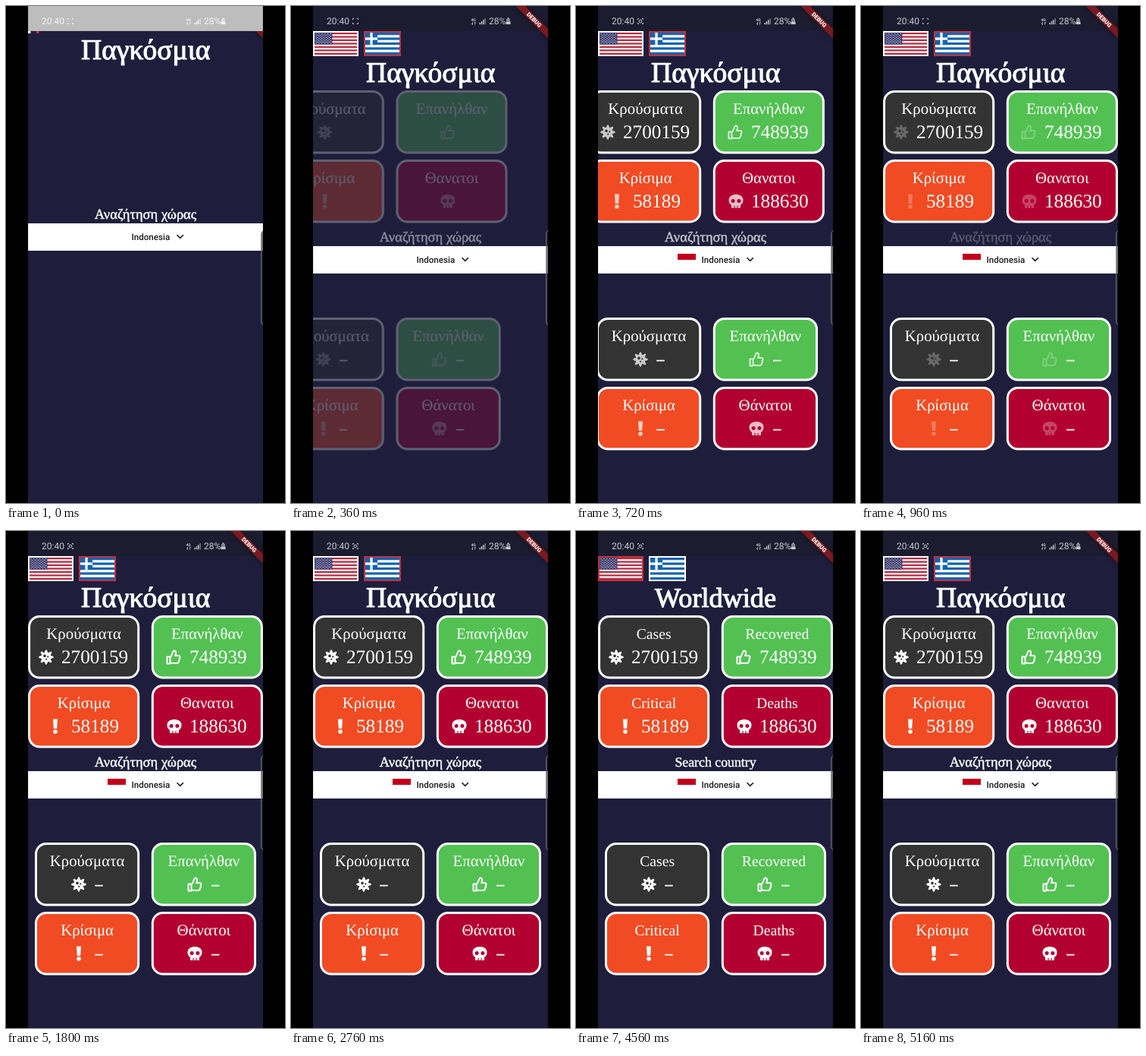
Animation of 368 by 654 pixels, one loop 5280 ms. Source, as an HTML page:

```html
<!DOCTYPE html>
<html lang="el">
<head>
<meta charset="utf-8">
<title>Dashboard</title>
<style>
html, body { margin: 0; width: 100%; height: 100%; overflow: hidden; background: #000; }
svg { display: block; font-family: "Liberation Serif", serif; text-rendering: geometricPrecision; }
.sans { font-family: Roboto, sans-serif; }
.mid { text-anchor: middle; }
.heavy { fill: #fff; stroke: #fff; }
.ribbon { filter: drop-shadow(0 0 3px rgba(0, 0, 0, .5)); }

/* one loop = 5280 ms */
.boot, .ready, .layout, .el, .en, .data, .nudge, .rec { animation: 5280ms step-end infinite; }
.boot { animation-name: boot; }
.ready { animation-name: ready; }
.layout { animation-name: layout; }
.el { animation-name: greek; }
.en { animation-name: english; }
.data { animation-name: data; }
.nudge { animation-name: nudge; }
.rec { animation-name: rec; }
.flash { animation: flash 5280ms linear infinite; }
.cards { animation: slide 5280ms linear infinite, fade 5280ms linear infinite; }

@keyframes boot { 0% { opacity: 1 } 2.2%, 100% { opacity: 0 } }
@keyframes ready { 0% { opacity: 0 } 2.2%, 100% { opacity: 1 } }
@keyframes layout { 0% { transform: translateY(-30px) } 2.2%, 100% { transform: none } }
@keyframes greek { 0% { opacity: 1 } 65.8% { opacity: 0 } 90.8%, 100% { opacity: 1 } }
@keyframes english { 0% { opacity: 0 } 65.8% { opacity: 1 } 90.8%, 100% { opacity: 0 } }
@keyframes data { 0% { opacity: 0 } 9%, 100% { opacity: 1 } }
@keyframes nudge { 0% { transform: translateX(var(--dx)) } 9%, 100% { transform: translateX(0) } }
@keyframes rec {
  0%, 17%, 36%, 54.5%, 76% { opacity: 0 }
  9%, 27.2%, 45.4%, 65.8%, 86.3%, 100% { opacity: 1 }
}
@keyframes flash {
  0%, 4.9% { opacity: 1 }
  8.7% { opacity: 0 }
  12.5% { opacity: 1 }
  16.9% { opacity: 0 }
  21.9%, 100% { opacity: 1 }
}
@keyframes slide {
  0% { transform: translateX(-86px) }
  3.03% { transform: translateX(-86px); animation-timing-function: ease-out }
  18.18%, 100% { transform: translateX(0) }
}
@keyframes fade { 0%, 4.2% { opacity: 0 } 13.1%, 100% { opacity: 1 } }
</style>
</head>
<body>
<svg id="stage" width="368" height="654"></svg>
<script>
const WHITE = '#fff', RED = '#c4323c';
const LEFT = 29.1, WIDTH = 309.8, MID = LEFT + WIDTH / 2;

const rect = (x, y, w, h, fill, extra = '') =>
  `<rect x="${x}" y="${y}" width="${w}" height="${h}" fill="${fill}" ${extra}/>`;
const text = (x, y, size, str, extra = '') =>
  `<text x="${x}" y="${y}" font-size="${size}" ${extra}>${str}</text>`;
const group = (cls, body, extra = '') => `<g class="${cls}" ${extra}>${body}</g>`;
const placed = (x, y, body) => `<g transform="translate(${x} ${y})">${body}</g>`;
const times = (n, f) => Array.from({ length: n }, (_, i) => f(i)).join('');
const dot = (x, y, r, fill) => `<circle cx="${x}" cy="${y}" r="${r}" fill="${fill}"/>`;

// Icons are drawn around 0,0; c is the card colour used for holes
const icons = {
  virus: c => times(8, i => `<path d="M-2.6 -5L-.9 -9.6H.9L2.6 -5Z" fill="#fff" transform="rotate(${i * 45})"/>`) +
    dot(0, 0, 6.2, WHITE) + dot(-2, -1.6, 1.8, c) + dot(2.3, -.6, 1.1, c) + dot(.2, 2.8, 1.1, c),
  thumb: () => `<path fill="none" stroke="#fff" stroke-width="2" stroke-linejoin="round"
    d="M-8.5 -.5H-4.5V8.5H-8.5ZM-4.5 .3C-1 -3 -1.5 -8.5 .6 -8.5C4 -8.5 3.3 -4 2 -2H6.5C9 -2 9 1 7.5 1.5C8.5 3 8 4.2 7 4.6C7.5 6.5 6 8 4 8H0C-2 8 -3 7.2 -4.5 7"/>`,
  alert: () => `<path fill="#fff" d="M-3 -9.5H3L2.2 3H-2.2Z"/>` + dot(0, 7, 2.8, WHITE),
  skull: c => `<path fill="#fff" d="M-9.5 -1.5C-9.5 -7 -5 -9 0 -9S9.5 -7 9.5 -1.5C9.5 2 8 3.5 6 5V8Q6 9 5 9H-5Q-6 9 -6 8V5C-8 3.5 -9.5 2 -9.5 -1.5Z"/>` +
    dot(-3.9, -.5, 2.5, c) + dot(3.9, -.5, 2.5, c) +
    `<path d="M-2 6V9M2 6V9" stroke="${c}" stroke-width="1.2"/>`
};

const kinds = [
  { icon: 'virus', fill: '#333333', el: 'Κρούσματα', en: 'Cases', value: '2700159', at: 53, num: 73 },
  { icon: 'thumb', fill: '#52c152', el: 'Επανήλθαν', en: 'Recovered', value: '748939', at: 221, num: 242 },
  { icon: 'alert', fill: '#f14b23', el: 'Κρίσιμα', en: 'Critical', value: '58189', at: 65, num: 86 },
  { icon: 'skull', fill: '#b20030', el: 'Θανατοι', elLower: 'Θάνατοι', en: 'Deaths', value: '188630', at: 222, num: 242 }
];

function card(k, i, lower) {
  const right = i % 2, row = i >> 1;
  const w = lower ? 138.2 : 147.1;
  const x = right ? MID + 7.8 : MID - 7.8 - w;
  const y = (lower ? 410 : 111) + row * 91;
  const mid = x + w / 2, base = y + 31.3;
  const glyph = group('flash', icons[k.icon](k.fill));
  let out = rect(x + 1.5, y + 1.5, w - 3, 80.5, k.fill, 'rx="13.6" stroke="#fff" stroke-width="3"') +
    text(mid, base, 20.8, lower && k.elLower || k.el, 'class="mid el"') +
    text(mid, base, 19.7, k.en, 'class="mid en"');
  if (lower) {
    out += placed(right ? 249 : 96, y + 55, glyph) +
      text(right ? 271.5 : 117.8, y + 60.6, 19, '–', 'stroke="#fff" stroke-width=".7"');
  } else {
    const dx = (right ? 260 : 98) - k.at;
    out += placed(k.at, y + 55, group('nudge', glyph, `style="--dx:${dx}px"`)) +
      text(k.num, y + 63, 25.2, k.value, 'class="data"');
  }
  return out;
}

const frame = (x, w, color) => rect(x + 1, 34, w - 2, 31, 'none', `stroke="${color}" stroke-width="2"`);

function usFlag() {
  const h = 29 / 13;
  return rect(31, 35, 56, 29, WHITE) +
    times(7, i => rect(31, 35 + i * 2 * h, 56, h, '#b52b40')) +
    rect(31, 35, 23.5, h * 7, '#3a3b6e') +
    times(9, r => times(6 - r % 2, c => dot(33 + c * 3.9 + (r % 2) * 1.95, 36.7 + r * 1.53, .6, WHITE)));
}

function greekFlag() {
  const h = 29 / 9, blue = '#1463b0';
  return rect(98, 35, 45, 29, WHITE) +
    times(5, i => rect(98, 35 + i * 2 * h, 45, h, blue)) +
    rect(98, 35, h * 5, h * 5, blue) +
    rect(98, 35 + h * 2, h * 5, h, WHITE) + rect(98 + h * 2, 35, h, h * 5, WHITE);
}

const flags =
  group('boot', rect(29, 33, 3.5, 3, WHITE) + rect(40, 33, 3.5, 3, RED)) +
  group('ready', usFlag() + greekFlag() +
    group('el', frame(29, 60, WHITE) + frame(96, 49, RED)) +
    group('en', frame(29, 60, RED) + frame(96, 49, WHITE)));

const picker =
  rect(LEFT, 316, WIDTH, 36, WHITE) +
  group('data', rect(134, 326, 24, 8, '#c2001c')) +
  text(165.5, 337.5, 11.6, 'Indonesia', 'class="sans" font-weight="500" fill="#1c1c1c"') +
  `<path d="M225.5 331.2l4.2 4.2l4.2 -4.2" fill="none" stroke="#1c1c1c" stroke-width="1.6"/>`;

const headings =
  group('heavy mid',
    text(184.3, 100, 37.6, 'Παγκόσμια', 'class="el"') +
    text(184, 99.5, 36.2, 'Worldwide', 'class="en"'), 'stroke-width="1.1"') +
  group('flash', group('heavy mid',
    text(184, 310, 18.5, 'Αναζήτηση χώρας', 'class="el"') +
    text(184, 310, 17.8, 'Search country', 'class="en"'), 'stroke-width=".45"'));

const ribbon =
  `<path class="ribbon" d="M290 -6.3L302.7 -6.3L345 36L345 48.7Z" fill="#7a1921"/>` +
  `<g transform="translate(320.8 18.1) rotate(45)">` +
  text(0, 2.7, 7.6, 'DEBUG', 'class="sans mid" font-weight="900" fill="#fff"') + '</g>';

const status = color => group('sans',
  text(47, 24.3, 12, '20:40') +
  `<path d="M81.5 18V16.5H83M87 16.5H88.5V18M81.5 22V23.5H83M87 23.5H88.5V22" fill="none" stroke="${color}"/>` +
  text(237.5, 19.6, 5, '4G', 'font-weight="700"') +
  `<path d="M239.5 21v3.5m-1.5 -1.5l1.5 1.5M242.5 24.5v-3.5m1.5 1.5l-1.5 -1.5" fill="none" stroke="${color}" stroke-width=".8"/>` +
  times(4, i => rect(248.5 + i * 2.3, 22 - i * 1.9, 1.4, 2.3 + i * 1.9, color, i > 2 ? 'opacity=".6"' : '')) +
  text(261, 24.3, 12, '28%') +
  rect(285.5, 15.5, 2, 1.5, color) + rect(284, 17, 5, 3.5, color, 'opacity=".6"') + rect(283.5, 20.5, 6, 3.6, color),
  `fill="${color}"`);

document.getElementById('stage').innerHTML =
  `<clipPath id="app">${rect(LEFT, 0, WIDTH, 654, WHITE)}</clipPath>` +
  '<g clip-path="url(#app)">' +
  rect(LEFT, 0, WIDTH, 654, '#1e1e3c') + rect(LEFT, 0, WIDTH, 33, '#1c1c30') +
  flags +
  group('layout', headings + picker) +
  group('cards', kinds.map((k, i) => card(k, i, false) + card(k, i, true)).join(''), 'fill="#fff"') +
  ribbon +
  group('boot', rect(LEFT, 0, WIDTH, 33, '#bdbdbd') + status('#f4f4f4')) +
  group('ready', status('#c9c9d0') +
    group('rec', '<circle cx="85" cy="20" r="1.9" fill="none" stroke="#c9c9d0"/>')) +
  '<path d="M341 295.5Q336.7 296 336.7 300V415Q336.7 419.5 341 420" fill="#1c1c28" fill-opacity=".6" stroke="#7c7c88"/>' +
  '</g>';
</script>
</body>
</html>
```
